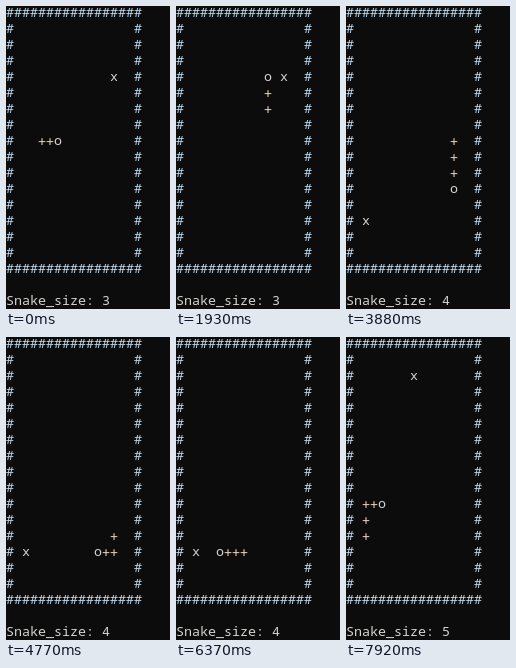
Write an HTML page with a canvas that moves like this. It is 164 px wide and 303 px high and loops after 8000 ms.

```html
<!DOCTYPE html>
<html lang="en">
<head>
<meta charset="utf-8">
<title>Console snake</title>
<style>
  html, body { margin: 0; width: 100%; height: 100%; overflow: hidden; background: #0c0c0c; }
  canvas { display: block; width: 164px; height: 303px; }
</style>
</head>
<body>
<canvas id="screen" width="164" height="303"></canvas>
<script>
const LOOP = 8000, CELL_W = 8, CELL_H = 16, BASELINE = 11, GRID = 17;
const GROW_DELAY = 1, FOOD_DELAY = 3; // in moves after a meal
const COLORS = { wall: '#bfd6e8', body: '#e2cdb6', plain: '#d6d3cf' };
const ctx = document.getElementById('screen').getContext('2d', { alpha: false });

// Corners of the route and when the head reaches them.
const corners = [
  { x: 4, y: 8, time: -400 },
  { x: 11, y: 8, time: 1000 },
  { x: 11, y: 4, time: 1930 },
  { x: 13, y: 4, time: 2330 },
  { x: 13, y: 13, time: 4310 },
  { x: 2, y: 13, time: 6830 },
  { x: 2, y: 10, time: 7430 },
  { x: 4, y: 10, time: 7920 }
];

const foods = [{ x: 13, y: 4 }, { x: 2, y: 13 }, { x: 8, y: 2 }];

const mix = (a, b, k) => a + (b - a) * k;
const sameCell = (a, b) => a.x === b.x && a.y === b.y;

// One cell per move, evenly paced between corners.
const path = [corners[0]];
for (let c = 1; c < corners.length; c++) {
  const a = corners[c - 1], b = corners[c];
  const moves = Math.abs(b.x - a.x) + Math.abs(b.y - a.y);
  for (let i = 1; i <= moves; i++) {
    const k = i / moves;
    path.push({
      x: Math.round(mix(a.x, b.x, k)),
      y: Math.round(mix(a.y, b.y, k)),
      time: Math.round(mix(a.time, b.time, k))
    });
  }
}

// Path index at which each food is eaten; the last one never is.
const meals = foods.map(food => {
  const index = path.findIndex(cell => sameCell(cell, food));
  return index < 0 ? Infinity : index;
});

function put(text, col, row, color = COLORS.plain) {
  ctx.fillStyle = color;
  ctx.fillText(text, col * CELL_W, row * CELL_H + BASELINE);
}

function putBody({ x, y }) {
  ctx.save();
  ctx.font = '500 15px "Noto Sans Mono", monospace';
  ctx.textAlign = 'center';
  ctx.fillStyle = COLORS.body;
  ctx.fillText('+', (x + 0.5) * CELL_W, y * CELL_H + BASELINE + 2);
  ctx.restore();
}

function drawWalls() {
  const last = GRID - 1;
  for (let row = 0; row < GRID; row++) {
    const step = row % last === 0 ? 1 : last;
    for (let col = 0; col < GRID; col += step) put('#', col, row, COLORS.wall);
  }
}

function draw(t) {
  ctx.fillStyle = '#0c0c0c';
  ctx.fillRect(0, 0, 164, 303);
  ctx.font = '500 13.333px "Noto Sans Mono", "DejaVu Sans Mono", monospace';
  drawWalls();

  const visited = path.filter(cell => cell.time <= t);
  const now = visited.length - 1;
  const size = 3 + meals.filter(meal => now >= meal + GROW_DELAY).length;
  const snake = visited.slice(-size);
  const head = snake.pop();
  snake.forEach(putBody);
  put('o', head.x, head.y);

  const food = foods.find((_, i) =>
    now < meals[i] && (i === 0 || now >= meals[i - 1] + FOOD_DELAY));
  if (food) put('x', food.x, food.y);

  put('Snake_size: ' + size, 0, GRID + 1);
}

const start = performance.now();
function tick() {
  draw((performance.now() - start) % LOOP);
  requestAnimationFrame(tick);
}
tick();
</script>
</body>
</html>
```
